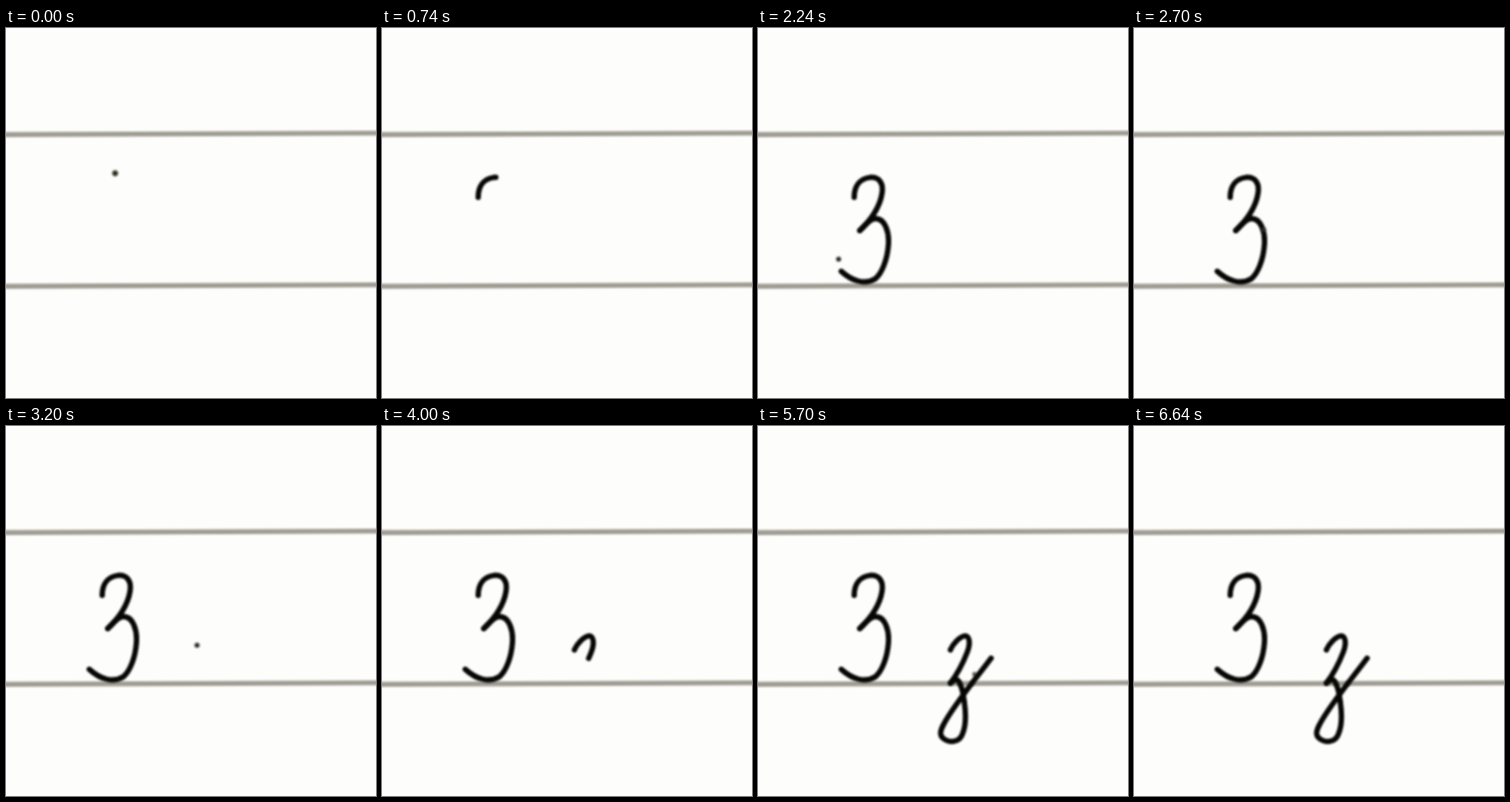
An HTML page for the animation above (6.68 s loop, 400 by 400 pixels).

```html
<!DOCTYPE html>
<html lang="en">
<head>
<meta charset="utf-8">
<title>Handwriting practice</title>
<style>
  html, body { margin: 0; width: 100%; height: 100%; overflow: hidden; background: #fdfdfb; }
  svg { display: block; width: 100vw; height: 100vh; }
  .rule { stroke: #9f9d93; stroke-width: 5.4; filter: blur(1.2px); }
  .ink { filter: blur(1px); }
  .ink path {
    fill: none; stroke: #060604; stroke-width: 5.8;
    stroke-linecap: round; stroke-linejoin: round;
    stroke-dasharray: 100 300; stroke-dashoffset: 103;
  }
  .ink path, .pen { animation: 6680ms linear infinite; }
  .pen { fill: #2c2b20; }

  #big-top { animation-name: big-top; }
  #big-bowl { animation-name: big-bowl; }
  #small-top { animation-name: small-top; }
  #small-loop { animation-name: small-loop; }
  .pen { animation-name: hover; }

  @keyframes big-top {
    0%, 6.74% { stroke-dashoffset: 103; }
    19.91%, 100% { stroke-dashoffset: 0; }
  }
  @keyframes big-bowl {
    0%, 21.41% { stroke-dashoffset: 103; }
    32.04%, 100% { stroke-dashoffset: 0; }
  }
  @keyframes small-top {
    0%, 51.65% { stroke-dashoffset: 103; }
    64.82%, 100% { stroke-dashoffset: 0; }
  }
  @keyframes small-loop {
    0%, 67.07% { stroke-dashoffset: 103; }
    70.96% { stroke-dashoffset: 89.2; }
    73.35% { stroke-dashoffset: 69; }
    83.53%, 100% { stroke-dashoffset: 0; }
  }
  /* The pen shows only while it is lifted between strokes. */
  @keyframes hover {
    0% { transform: translate(118px, 157px) scale(1.15); opacity: 1; }
    6.74% { transform: translate(104px, 183px); opacity: 1; }
    6.75%, 32.03% { transform: translate(90px, 263px); opacity: 0; }
    32.04% { transform: translate(90px, 263px); opacity: 1; }
    33.53% { transform: translate(87px, 250px); opacity: 1; }
    40.42% { transform: translate(140px, 218px); opacity: 1; }
    47.9% { transform: translate(206.5px, 237px); opacity: 1; }
    51.65% { transform: translate(208px, 242px); opacity: 1; }
    51.66%, 83.52% { transform: translate(252px, 251px); opacity: 0; }
    83.53% { transform: translate(252px, 251px); opacity: 1; }
    85.33% { transform: translate(234px, 268px) scale(.9); opacity: .8; }
    89.82% { transform: translate(222px, 352px) scale(.8); opacity: .6; }
    91.32%, 99.99% { transform: translate(220px, 362px) scale(.8); opacity: 0; }
    100% { transform: translate(118px, 157px) scale(1.15); opacity: 1; }
  }
</style>
</head>
<body>
<svg viewBox="0 0 400 400">
  <g class="rule">
    <path d="M-5 115.2L405 113.6"/>
    <path d="M-5 279.2L405 277.6"/>
  </g>
  <g class="ink">
    <path id="big-top" pathLength="100" d="M104 183C104 171 110 163 121 161.500C131 160.500 136 168 134 179C132 193 122 208 110 219"/>
    <path id="big-bowl" pathLength="100" d="M110 219C116 213 121 206 127 206C137 206 142 220 141 234C140 250 134 265 127 271C116 278 102 274 90 263"/>
    <path id="small-top" pathLength="100" d="M208 242C211 235 218 228 223 227C229 226 230 235 226 245C221 258 214 270 208 278"/>
    <path id="small-loop" pathLength="100" d="M208 278C212 274 215 273 217 276C220 281 222 289 223 298C225 312 225 324 221 333C218 341.500 209 342.500 203 339.500C196 336 196 331 201 322C211 303 234 275 252 251"/>
    <circle class="pen" r="2.7"/>
  </g>
</svg>
</body>
</html>
```
